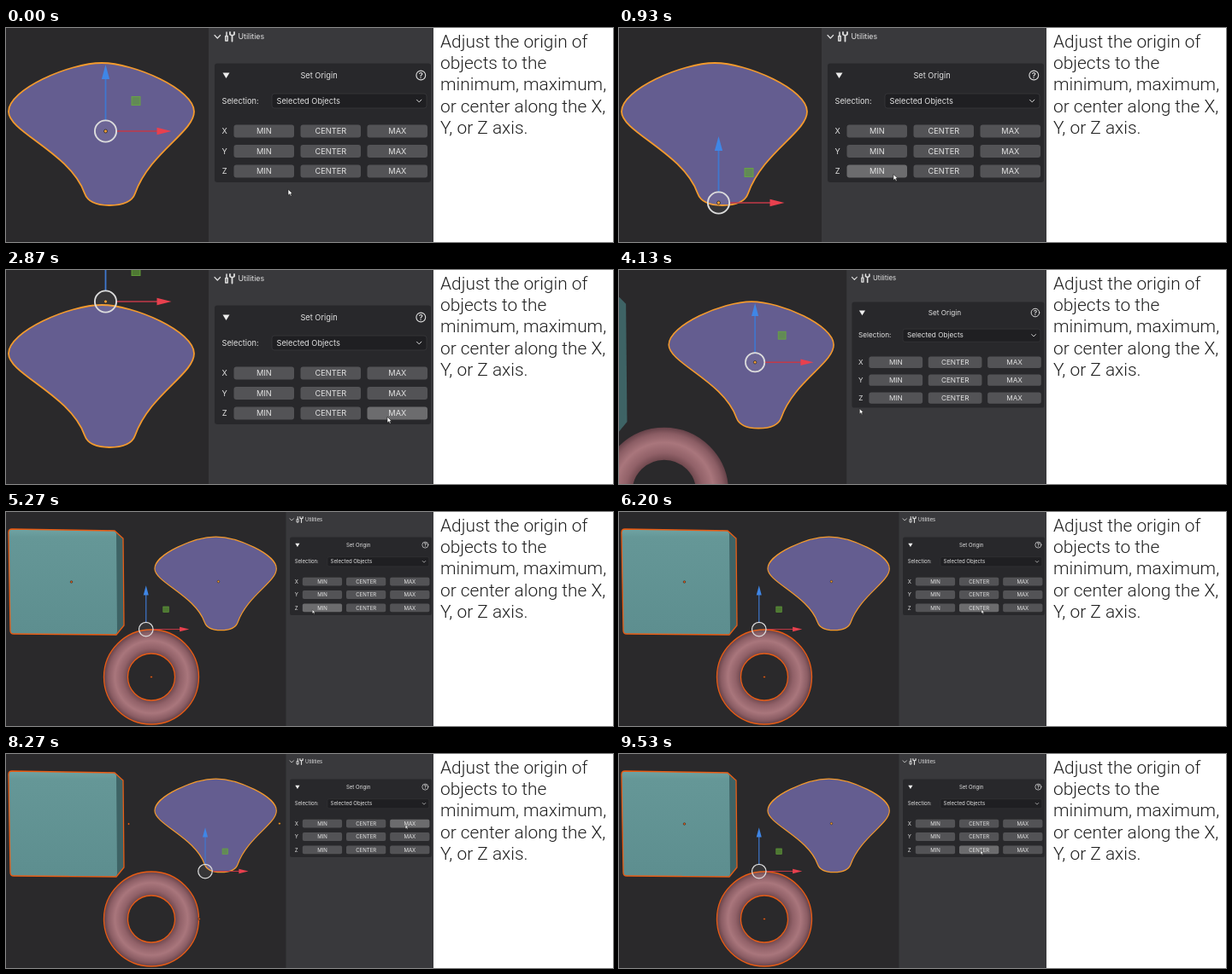
An HTML page for the animation above (9.6 s loop, 710x251 px).

```html
<!DOCTYPE html>
<html lang="en">
<head>
<meta charset="utf-8">
<title>Set Origin</title>
<style>
html, body { margin: 0; width: 100%; height: 100%; overflow: hidden; background: #fff; }
svg { display: block; width: 710px; height: 251px; }
.ui { font: 9.25px Inter, sans-serif; fill: #e2e2e2; }
.mid { text-anchor: middle; }
.copy { font: 300 20.9px Roboto, sans-serif; fill: #202020; }
.line { fill: none; stroke: #dedede; stroke-linecap: round; stroke-linejoin: round; }
</style>
</head>
<body>
<svg viewBox="0 0 710 251">
  <defs>
    <clipPath id="view"><rect width="500" height="251"/></clipPath>
    <radialGradient id="ring" gradientUnits="userSpaceOnUse" cx="170" cy="193.5" r="56">
      <stop offset=".48" stop-color="#6d464c"/>
      <stop offset=".6" stop-color="#916168"/>
      <stop offset=".76" stop-color="#a9767c"/>
      <stop offset=".9" stop-color="#8b5d64"/>
      <stop offset="1" stop-color="#623f46"/>
    </radialGradient>
    <linearGradient id="face" x1="0" y1="0" x2="0" y2="1">
      <stop offset="0" stop-color="#6fa3a3"/>
      <stop offset=".08" stop-color="#659797"/>
      <stop offset="1" stop-color="#5d8e8f"/>
    </linearGradient>
  </defs>
  <rect width="710" height="251" fill="#fff"/>
  <g clip-path="url(#view)">
    <rect width="500" height="251" fill="#2a292b"/>
    <g id="stage">
      <path d="M112 41C150 41 220 72 220 98C220 122 168 146 151 194Q146 208 121 208Q97 208 92 194C75 146 3 122 3 98C3 72 74 41 112 41Z"
        fill="#645d90" stroke="#f39a2d" stroke-width="1.8"/>
      <g id="extra">
        <path d="M120 21L128 22L137 31L138 133L129 144L120 143Z" fill="#3e6365"/>
        <path d="M7 20L125 22Q129 22 129 26L130 140Q130 144 126 144L9 143Q5 143 5 139L3 24Q3 20 7 20Z" fill="url(#face)"/>
        <path class="edge" d="M7 20L127 22L137 31L138 133L129 144L9 143Q5 143 5 139L3 24Q3 20 7 20Z"/>
        <circle cx="170" cy="193.5" r="41.5" fill="none" stroke="url(#ring)" stroke-width="28"/>
        <circle class="edge" cx="170" cy="193.5" r="55.5"/>
        <circle class="edge" cx="170" cy="193.5" r="27.5"/>
      </g>
      <g id="dots"></g>
      <g id="gizmo">
        <path d="M0-13V-63" stroke="#3f78d0" stroke-width="1.8"/>
        <path d="M-4.6-61L0-78L4.6-61Z" fill="#3f86e6"/>
        <path d="M13 0H62" stroke="#c23a48" stroke-width="1.5"/>
        <path d="M60-4.3L77 0L60 4.3Z" fill="#e8404e"/>
        <rect x="30.5" y="-40.5" width="10" height="10" fill="#62a338" fill-opacity=".65" stroke="#69ad3b" stroke-opacity=".8"/>
        <circle r="12.6" fill="#fff" fill-opacity=".06" stroke="#dcdcdc" stroke-width="1.9"/>
      </g>
      <g id="panel">
        <rect x="237" y="-10" width="270" height="420" fill="#39393c"/>
        <path class="line" d="M244 8.5L247.3 12L250.6 8.5" stroke-width="1.2"/>
        <path class="line" d="M258 5V9M256.8 9.5H259.2V15H256.8Z" stroke-width="1.5"/>
        <path class="line" d="M262 5V7.5L264.5 9L267 7.5V5M264.5 9V15.5" stroke-width="1.8"/>
        <text class="ui" x="271.5" y="13.2" style="font-size:8.8px">Utilities</text>
        <rect x="244" y="41.5" width="253" height="139.5" rx="3" fill="#28282b"/>
        <path d="M253.5 52.5H261.5L257.5 59Z" fill="#eee"/>
        <text class="ui mid" x="366" y="58.8">Set Origin</text>
        <circle class="line" cx="485.3" cy="55.5" r="5.4" stroke-width="1.1"/>
        <text class="ui mid" x="485.3" y="58.8" style="font-weight:600">?</text>
        <text class="ui" x="252.5" y="88.6">Selection:</text>
        <rect x="311" y="77" width="181" height="17" rx="3" fill="#1f1f22" stroke="#38383b" stroke-width=".8"/>
        <text class="ui" x="316.5" y="88.6">Selected Objects</text>
        <path class="line" d="M480.5 84.2L483.2 86.9L485.9 84.2" stroke-width="1"/>
      </g>
      <path id="cursor" d="M0 0V7L1.8 5.5L3 8L4.2 7.4L3 5H5.2Z" fill="#fff" stroke="#161616" stroke-width=".6"/>
    </g>
  </g>
  <g id="copy" class="copy"></g>
</svg>
<script>
const LOOP = 9600, FAR = 0.656, PX = 500, PY = 6.4;
const $ = id => document.getElementById(id);

function add(parent, tag, attrs, text) {
  const el = document.createElementNS("http://www.w3.org/2000/svg", tag);
  for (const k in attrs) el.setAttribute(k, attrs[k]);
  if (text) el.textContent = text;
  parent.appendChild(el);
  return el;
}

["Adjust the origin of", "objects to the", "minimum, maximum,", "or center along the X,", "Y, or Z axis."]
  .forEach((s, i) => add($("copy"), "text", { x: 508, y: 23 + i * 25.2 }, s));

const buttons = [];
["X", "Y", "Z"].forEach((axis, r) => {
  const y = 121 + r * 23.5;
  add($("panel"), "text", { class: "ui mid", x: 255.7, y: y + 3.3 }, axis);
  ["MIN", "CENTER", "MAX"].forEach((label, c) => {
    const x = 266.5 + c * 78;
    const el = add($("panel"), "rect", { x, y: y - 7.5, width: 70.5, height: 15, rx: 3 });
    buttons.push({ el, x, y: y - 7.5 });
    add($("panel"), "text", { class: "ui mid", x: x + 35.4, y: y + 3.3 }, label);
  });
});

const zoom = s => `matrix(${s} 0 0 ${s} ${PX * (1 - s)} ${PY * (1 - s)})`;
$("extra").setAttribute("transform", zoom(1 / FAR));
const edges = document.querySelectorAll(".edge");
edges.forEach(e => {
  e.setAttribute("fill", "none");
  e.setAttribute("stroke", "#e85c14");
  e.setAttribute("stroke-width", 1.3);
});

// Centre and half extents, in unzoomed coordinates
const wide = (x, y, w, h) => ({
  x: PX + (x - PX) / FAR, y: PY + (y - PY) / FAR, w: w / FAR, h: h / FAR
});
const objects = [{ x: 116.5, y: 121, w: 109, h: 84 }, wide(76.5, 82, 67, 62), wide(170, 193.5, 56, 55)];
const dots = objects.map((o, i) =>
  add($("dots"), "circle", { r: 2, fill: i ? "#e8601a" : "#f39a2d", stroke: "#1c1c1c", "stroke-width": .8 }));

// time, origin side along x, origin side along z
const clicks = [
  [0, 0, 0], [650, 0, 1], [1500, 0, 0], [2600, 0, -1], [3300, 0, 0],
  [5450, 0, 1], [6200, 0, 0], [7350, -1, 0], [8150, 1, 0], [9080, 0, 0]
];
const path = [
  [0, 330, 190], [200, 330, 190], [550, 312, 172], [850, 312, 172], [1250, 396, 175],
  [2050, 397, 175], [2450, 446, 173], [2880, 446, 173], [3100, 385, 172], [3450, 385, 172],
  [3950, 254, 183], [4500, 254, 183], [5000, 284, 172], [5600, 284, 172], [5950, 384, 172],
  [6400, 384, 172], [7100, 318.6, 126], [7500, 318.6, 126], [7900, 450, 124], [8400, 450, 124],
  [8800, 382, 124], [9150, 382, 124], [9450, 382.6, 170], [LOOP, 382.6, 170]
];
const ZOOM_AT = 4000, ZOOM_MS = 345, SELECT_AT = 4500;

function ease(u) {
  u = Math.max(0, Math.min(1, u));
  return u * u * (3 - 2 * u);
}

function cursorAt(t) {
  const i = path.findIndex(p => p[0] > t);
  const a = path[i - 1], b = path[i], u = ease((t - a[0]) / (b[0] - a[0]));
  return [a[1] + (b[1] - a[1]) * u, a[2] + (b[2] - a[2]) * u];
}

function draw(t) {
  const all = t >= SELECT_AT;
  $("stage").setAttribute("transform", zoom(1 - (1 - FAR) * ease((t - ZOOM_AT) / ZOOM_MS)));
  $("extra").style.display = t > ZOOM_AT ? "" : "none";
  edges.forEach(e => { e.style.display = all ? "" : "none"; });

  const [, sx, sz] = clicks.filter(c => c[0] <= t).pop();
  const origins = objects.map(o => [o.x + sx * o.w, o.y + sz * o.h]);
  dots.forEach((d, i) => {
    d.style.display = i && !all ? "none" : "";
    d.setAttribute("cx", origins[i][0]);
    d.setAttribute("cy", origins[i][1]);
  });

  const chosen = all ? origins : origins.slice(0, 1);
  const middle = k => {
    const v = chosen.map(o => o[k]);
    return (Math.min(...v) + Math.max(...v)) / 2;
  };
  $("gizmo").setAttribute("transform", `translate(${middle(0) + (all ? 2 : 0)} ${middle(1)})`);

  const [x, y] = cursorAt(t);
  $("cursor").setAttribute("transform", `translate(${x} ${y - .8})`);
  buttons.forEach(b => {
    const over = x >= b.x && x <= b.x + 71 && y >= b.y - 1 && y <= b.y + 16;
    b.el.setAttribute("fill", over ? "#6c6c6e" : "#535356");
  });
}

const start = performance.now();
function tick() {
  draw((performance.now() - start) % LOOP);
  requestAnimationFrame(tick);
}
tick();
</script>
</body>
</html>
```
